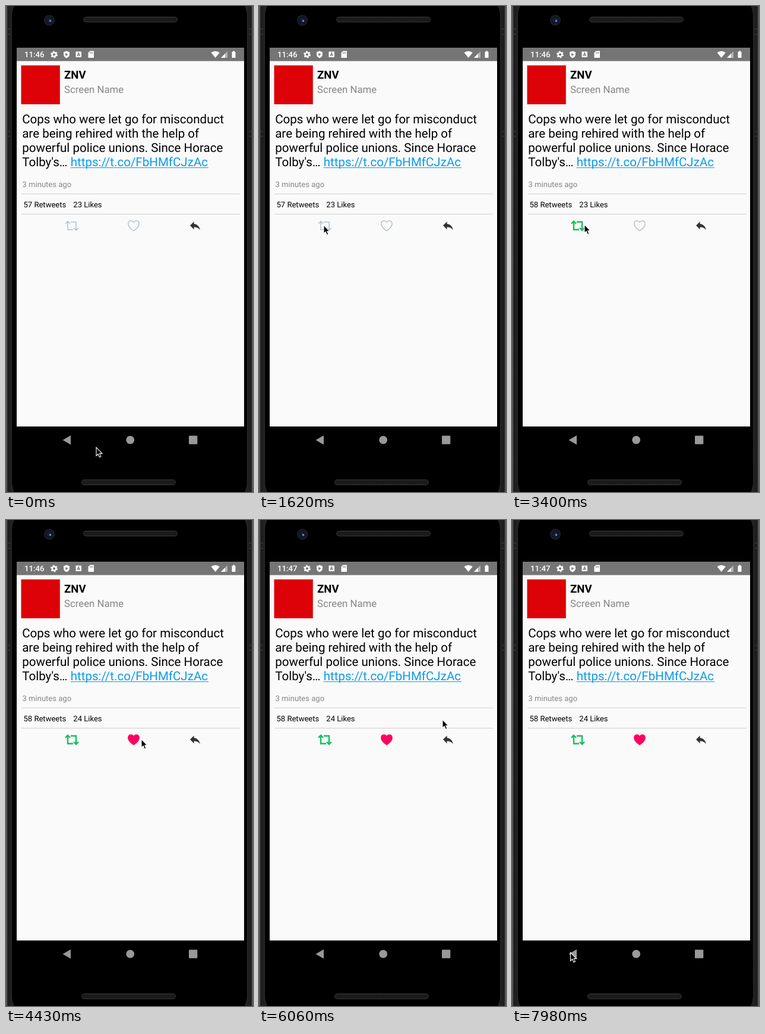
Recreate the animation shown at these times as an HTML page. Size 416 by 816 pixels, loop 8 s.

```html
<!DOCTYPE html>
<html lang="en">
<head>
<meta charset="utf-8">
<title>Post detail</title>
<style>
html, body { margin: 0; width: 100%; height: 100%; overflow: hidden; background: #000; }
svg { display: block; width: 100%; height: 100%; font-family: Roboto, Arial, sans-serif; }
text { white-space: pre; text-rendering: geometricPrecision; }
.body { font-size: 20.56px; }
.small { font-size: 13.05px; }
.grey { fill: #868686; }
.link { fill: #0c9cf0; }
.status { fill: #fff; }
.retweet { fill: none; stroke: #a9b9c3; stroke-width: 1.25; }
.retweet.on { stroke: #10c060; stroke-width: 2.4; }
.heart { fill: none; stroke: #a9b9c3; stroke-width: 1.25; }
.heart.on { fill: #ff0060; stroke: #ff0060; }
</style>
</head>
<body>
<svg viewBox="0 0 416 816" preserveAspectRatio="none">
  <defs>
    <linearGradient id="edge">
      <stop offset="0" stop-color="#6a6a6a"/>
      <stop offset=".15" stop-color="#4a4a4a"/>
      <stop offset=".3" stop-color="#1c1c1c"/>
      <stop offset="1" stop-color="#222"/>
    </linearGradient>
    <radialGradient id="lens">
      <stop offset="0" stop-color="#1c2350"/>
      <stop offset=".5" stop-color="#12162c"/>
      <stop offset=".75" stop-color="#14161d"/>
      <stop offset="1" stop-color="#26272d"/>
    </radialGradient>
    <pattern id="mesh" width="3" height="3" patternUnits="userSpaceOnUse">
      <rect width="3" height="3" fill="#161616"/>
      <circle cx="1.5" cy="1.5" r=".8" fill="#2c2c2c"/>
    </pattern>
    <g id="side">
      <rect width="30" height="816" fill="#222"/>
      <rect width="10" height="816" fill="url(#edge)"/>
      <path d="M0 38.5H7M0 47.5H7M0 210.5H6M0 218.5H6" stroke="#444"/>
    </g>
  </defs>

  <!-- phone -->
  <rect width="416" height="816"/>
  <use href="#side"/>
  <use href="#side" transform="translate(416) scale(-1 1)"/>
  <rect x="9.500" y="-20" width="397" height="856" rx="36" stroke="#2b2b2b"/>
  <circle cx="73" cy="24" r="9" fill="url(#lens)"/>
  <circle cx="74.500" cy="25" r="1.700" fill="#7488dc"/>
  <rect x="130.5" y="18.5" width="158" height="8.5" rx="4.2" fill="url(#mesh)" stroke="#363636"/>
  <rect x="127.5" y="795.5" width="158" height="8.5" rx="4.2" fill="url(#mesh)" stroke="#363636"/>
  <g fill="#999">
    <path d="M95.5 728.700L109 721V736.500Z"/>
    <circle cx="209.200" cy="728.700" r="6.900"/>
    <rect x="308" y="721.500" width="14.300" height="14.300" rx="1"/>
  </g>

  <!-- screen -->
  <rect x="18" y="70" width="383" height="636" fill="#fafafa"/>
  <rect x="18" y="70" width="383" height="22.500" fill="#757575"/>
  <g class="status">
    <text id="clock" x="31" y="86" font-size="13.2" font-weight="500">11:46</text>
    <circle cx="81" cy="81.500" r="3.300" fill="none" stroke="#fff" stroke-width="2.500"/>
    <circle cx="81" cy="81.500" r="5" fill="none" stroke="#fff" stroke-width="2" stroke-dasharray="2.600 2.636"/>
    <path d="M102 75.500L107 77.500V81Q107 85.500 102 87.500Q97 85.500 97 81V77.500Z"/>
    <path d="M100.300 78.800V84L104.500 81.400Z" fill="#757575"/>
    <rect x="117.500" y="76.500" width="9.500" height="9.500" rx="1"/>
    <path d="M120 84L122.250 78.500L124.500 84M120.800 82.300H123.700" fill="none" stroke="#757575" stroke-width="1.200"/>
    <path d="M141.500 75.500H148V87H138.500V78.500Z"/>
    <path d="M141.700 77.500V80M143.700 77.500V80M145.700 77.500V80" stroke="#757575"/>
    <path d="M345.500 78.300Q352.500 73 359.800 78.300L352.600 87Z"/>
    <path d="M362 87L373 76V87Z" opacity=".45"/>
    <path d="M362 87L369 80V87Z"/>
    <path d="M380.500 77H382V75.500H385V77H386.500V87H380.500Z"/>
  </g>

  <!-- post -->
  <rect x="25.500" y="99.700" width="65.300" height="65.300" fill="#dc0207"/>
  <text x="98" y="122" font-size="18.6" font-weight="700">ZNV</text>
  <text x="98" y="146" font-size="16.8" class="grey">Screen Name</text>
  <g class="body">
    <text x="27.200" y="196.800">Cops who were let go for misconduct</text>
    <text x="27.200" y="220.900">are being rehired with the help of</text>
    <text x="27.200" y="244.900">powerful police unions. Since Horace</text>
    <text x="27.200" y="269">Tolby's…</text>
    <text x="108.700" y="269" class="link">https://t.co/FbHMfCJzAc</text>
  </g>
  <path d="M108.700 271.500H341" stroke="#0c9cf0" stroke-width="1.200"/>
  <text x="27.500" y="304" class="small grey">3 minutes ago</text>
  <path d="M26 315.500H394M26 349.500H394" stroke="#cfcfcf"/>
  <text id="retweets" x="29.500" y="338" class="small">57 Retweets</text>
  <text id="likes" x="113.300" y="338" class="small">23 Likes</text>
  <path id="retweet" class="retweet" d="M100 365.500L104 361.500L108 365.500M104 362V375.500H113M109 362.500H118V376M114 372.500L118 376.500L122 372.500"/>
  <path id="heart" class="heart" d="M215 377.500C211 374.800 205.800 370.500 205.800 365.700C205.800 360.200 212.300 358.700 215 363.300C217.700 358.700 224.200 360.200 224.200 365.700C224.200 370.500 219 374.800 215 377.500Z"/>
  <path transform="translate(307.200 357.300) scale(.94)" fill="#333" d="M10 9V5L3 12L10 19V14.900C15 14.900 18.500 16.500 21 20C20 15 17 10 10 9Z"/>

  <path id="cursor" d="M0 0V14.200L3.200 11.300L5.400 16.500L7.900 15.400L5.700 10.400H10Z" stroke="#fff" stroke-width="1.100"/>
</svg>
<script>
const LOOP = 8000;
const RETWEET_AT = 2950, LIKE_AT = 4130, MINUTE_AT = 5760;

// bursts of pointer movement: first step, last step, pointer tips
const bursts = [
  [0, 0, "152,741"],
  [150, 1180, "165,655 205,565 228,480 232,400 200,345 165,331 133,359 124,360"],
  [1330, 1620, "116,364 110,367 109,368"],
  [2060, 2360, "109,369 110,370 111,369.500"],
  [3400, 4430, "122,367 146,367 176,367 202,368 214,369 216,369 218,369 228,368"],
  [4570, 5310, "244,369 268,371 292,373 308,373 314,371 315,370"],
  [5760, 6650, "314,362 311,346 309,335 310,340 313,354 317,366 318,369"],
  [7240, 7980, "300,425 258,525 190,620 130,695 104,722 98.500,726"]
];

const steps = bursts.flatMap(([from, to, tips]) => {
  const list = tips.split(" ");
  const gap = (to - from) / Math.max(1, list.length - 1);
  return list.map((tip, i) => ({ at: Math.floor((from + i * gap) / 10 + 1e-6) * 10, tip }));
});

const el = id => document.getElementById(id);
const setText = (id, text) => {
  if (el(id).textContent !== text) el(id).textContent = text;
};

function draw(t) {
  const retweeted = t >= RETWEET_AT, liked = t >= LIKE_AT;
  const { tip } = steps.findLast(s => s.at <= t);
  el("cursor").setAttribute("transform", `translate(${tip})`);
  el("retweet").classList.toggle("on", retweeted);
  el("heart").classList.toggle("on", liked);
  setText("retweets", `${57 + retweeted} Retweets`);
  setText("likes", `${23 + liked} Likes`);
  setText("clock", t >= MINUTE_AT ? "11:47" : "11:46");
}

const start = performance.now();
function tick() {
  draw((performance.now() - start) % LOOP);
  requestAnimationFrame(tick);
}
tick();
</script>
</body>
</html>
```
